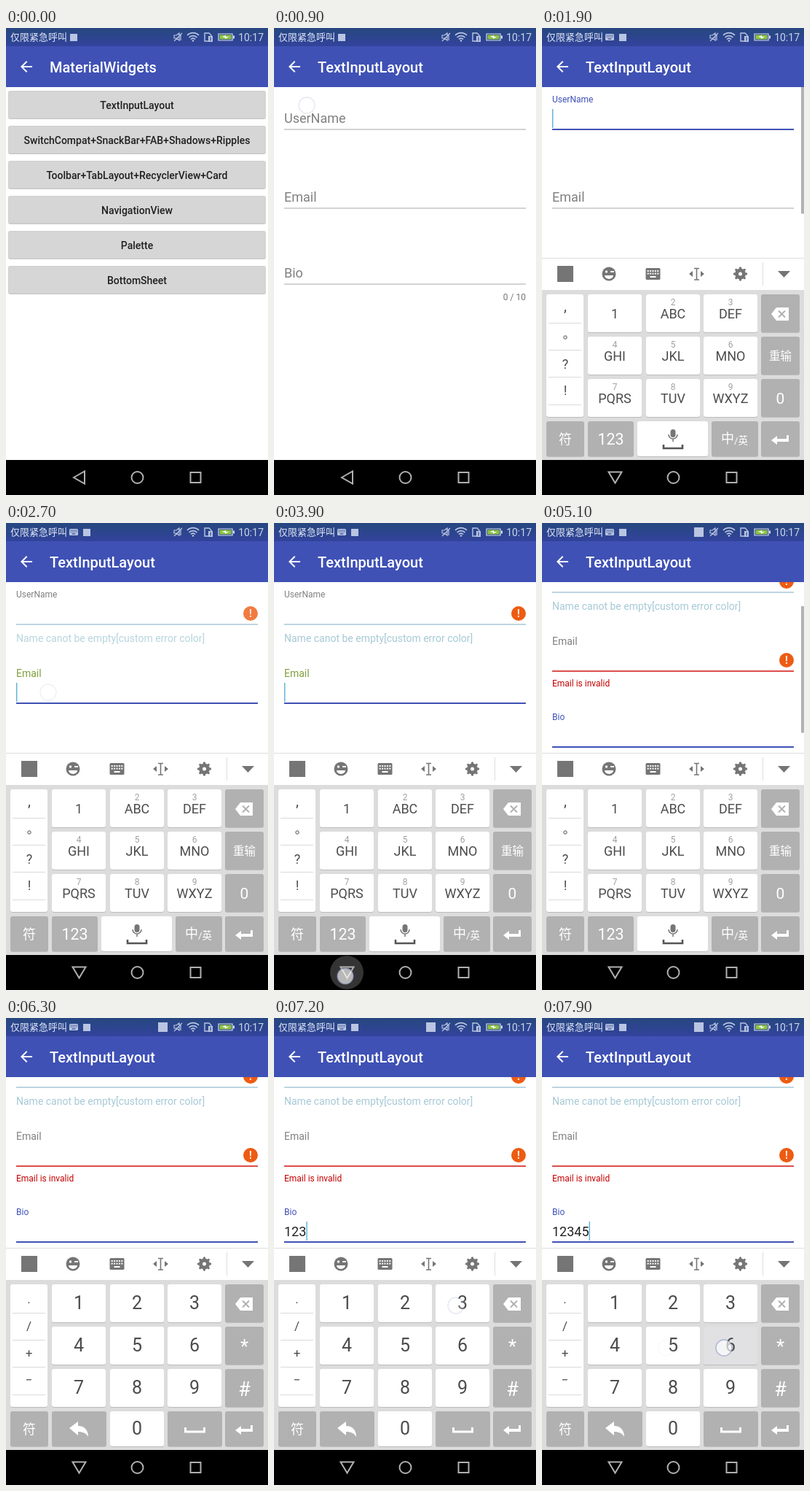
Animation of 360x640 px, one loop 8 s. Source, as an HTML page with a canvas:

```html
<!DOCTYPE html>
<html lang="en">
<head>
<meta charset="utf-8">
<title>Text input demo</title>
<style>
html, body { margin: 0; width: 100%; height: 100%; overflow: hidden; background: #fff }
canvas { display: block }
</style>
</head>
<body>
<canvas id="stage" width="360" height="640"></canvas>
<script>
const c = document.getElementById('stage').getContext('2d');
const LOOP = 8000, BLUE = '#3f51b5', STATUS = '#b9c5e2', ICON = '#757575', NAV = '#b0b0b0';
const FOCUS = { name: 1620, email: 2500, bio: 4600 };
const BACK = 3860, NUMERIC = 6080;

const MENU = ['TextInputLayout', 'SwitchCompat+SnackBar+FAB+Shadows+Ripples',
  'Toolbar+TabLayout+RecyclerView+Card', 'NavigationView', 'Palette', 'BottomSheet'];
const COLS = [63, 143, 222], ROWS = [365, 423, 481];
const LETTERS = ['', 'ABC', 'DEF', 'GHI', 'JKL', 'MNO', 'PQRS', 'TUV', 'WXYZ'];
const TYPED = [6600, 6810, 7000, 7450, 7640, 7870];  // press times of keys 1 to 6
const TOUCHES = [[700, 45, 106], [1590, 60, 124], [2470, 58, 232], [BACK, 98, 621], [4500, 48, 324],
  [5980, 95, 563], ...TYPED.map((at, i) => [at, COLS[i % 3] + 28, ROWS[i / 3 | 0] + 29])];

const clamp = v => Math.min(1, Math.max(0, v));
const ramp = (t, from, length) => clamp((t - from) / length);
const ease = p => p * p * (3 - 2 * p);
const mix = (a, b, p) => a + (b - a) * p;

function text(s, x, y, size, color, align = 'left', weight = 400) {
  c.font = `${weight} ${size}px Roboto, "Noto Sans CJK SC", "Noto Sans CJK", sans-serif`;
  c.fillStyle = color;
  c.textAlign = align;
  c.fillText(s, x, y);
}
function box(x, y, w, h, color, r = 0) {
  c.fillStyle = color;
  c.beginPath();
  c.roundRect(x, y, w, h, r);
  c.fill();
}
function shape(d, color, width = 0, x = 0, y = 0) {
  const p = new Path2D(d);
  c.save();
  c.translate(x, y);
  c.fillStyle = c.strokeStyle = color;
  c.lineWidth = width;
  width ? c.stroke(p) : c.fill(p);
  c.restore();
}
function disc(x, y, r, fill, stroke, width = 1) {
  c.beginPath();
  c.arc(x, y, r, 0, 7);
  if (fill) { c.fillStyle = fill; c.fill(); }
  if (stroke) { c.strokeStyle = stroke; c.lineWidth = width; c.stroke(); }
}
function faded(alpha, draw) {
  if (alpha <= 0) return;
  c.save();
  c.globalAlpha *= alpha;
  draw();
  c.restore();
}

function keyboardIcon(x, y, w, h, color, hole) {
  box(x - w / 2, y - h / 2, w, h, color, 1.5);
  const u = w / 20;
  for (let row = 0; row < 2; row++)
    for (let i = 0; i < 5; i++) box(x + (i * 3.4 - 7.8) * u, y + (row * 3.6 - 5) * u, 2 * u, 2 * u, hole);
  box(x - 4 * u, y + 3 * u, 8 * u, 2 * u, hole);
}

function statusBar(t, keyboard, imeReady) {
  const g = c.createLinearGradient(0, 0, 0, 25);
  g.addColorStop(0, '#26477f');
  g.addColorStop(1, '#32439c');
  box(0, 0, 360, 25, g);
  text('仅限紧急呼叫', 6, 17, 13, '#e3e9f6');
  if (keyboard) keyboardIcon(93, 12.5, 12, 9, STATUS, '#2c458c');
  box(keyboard ? 106 : 88, 8, 10, 10, STATUS);
  if (imeReady) box(209, 6, 13, 13, STATUS);
  shape('M231 10h3l4-3v10l-4-3h-3zM231 18L242 7M240 9v8', STATUS, 1.2);
  shape('M249 10a11 11 0 0 1 16 0M251.5 13a7.5 7.5 0 0 1 11 0M254 15.5a4 4 0 0 1 6 0', STATUS, 1.7);
  disc(257, 17.5, 1.3, STATUS);
  shape('M273 7h6l3 3v8h-9z', STATUS, 1.4);
  box(278, 11, 6, 8, STATUS);
  box(280.5, 12.5, 1.2, 5, '#2c458c');
  shape('M292 8h19v9h-19z', '#d5dcee', 1.2);
  box(312, 10.5, 2, 4, '#d5dcee');
  box(293.5, 9.5, 16, 6, '#8cc63f');
  shape('M297 12l5-2v2h4l-5 3v-2z', '#fff');
  text('10:17', 354, 17.5, 14, '#cbd4ea', 'right');
}

function toolbar(title) {
  box(0, 25, 360, 56, BLUE);
  shape('M20 11H7.83l5.59-5.59L12 4l-8 8 8 8 1.41-1.41L7.83 13H20z', '#fff', 0, 16, 41);
  text(title, 60, 61, 20, '#fff', 'left', 500);
}

function menuPage(t) {
  box(0, 81, 360, 511, '#fff');
  toolbar('MaterialWidgets');
  MENU.forEach((label, i) => {
    const y = 86 + i * 48;
    box(3, y, 354, 39, '#c9c9c9', 3);
    box(3.5, y + .5, 353, 37, !i && t >= 700 ? '#c6c6c6' : '#d7d6d7', 2);
    text(label, 180, y + 25, 14, '#202020', 'center', 500);
  });
}

// Hint shrinks into a label above the line; y values are baselines.
function field(label, p, hintY, labelY, labelSize, color) {
  text(label, 14, mix(hintY, labelY, p ** 2.3), mix(18, labelSize, p), color);
}
function underline(y, color, width) { box(14, y - width / 2, 332, width, color); }
function errorIcon(y) {
  disc(336, y, 10, '#ee5b12');
  text('!', 336, y + 5, 14, '#fff', 'center', 700);
}
function cursor(t, since, x, y) {
  if (t >= since && (t - since) % 1000 < 500) box(x, y, 1.4, 26, '#58b2d6');
}

function formPage(t, bottom) {
  const on = key => ease(ramp(t, FOCUS[key], 200));
  const onName = t >= FOCUS.name && t < FOCUS.email;
  const onEmail = t >= FOCUS.email && t < FOCUS.bio, onBio = t >= FOCUS.bio;
  const nameError = ramp(t, FOCUS.email, 250), emailError = ramp(t, FOCUS.bio, 160);
  const scroll = onBio ? 44 : 0;

  box(0, 81, 360, 511, '#ededed');
  c.save();
  c.beginPath();
  c.rect(0, 81, 360, bottom - 81);
  c.clip();
  box(0, 81, 360, 511, '#fff');
  c.translate(0, -scroll);

  field('UserName', on('name'), 130, 102, 12, onName ? BLUE : '#808080');
  underline(139, nameError ? '#a6c9d6' : onName ? BLUE : '#c4c4c4', onName ? 2 : 1.6);
  if (onName) cursor(t, FOCUS.name, 14, 111);
  faded(nameError, () => {
    text('Name canot be empty[custom error color]', 14, 162.5, 14, '#a6c9d6');
    errorIcon(124);
  });

  field('Email', on('email'), 238, 210.5, 14, onEmail ? '#7fa03c' : '#808080');
  underline(247, emailError ? '#d01010' : onEmail ? BLUE : '#c4c4c4', onEmail ? 2 : 1.6);
  if (onEmail) cursor(t, FOCUS.email, 14, 219);
  faded(emailError, () => {
    text('Email is invalid', 14, 268, 12, '#c40000');
    errorIcon(232);
  });

  field('Bio', on('bio'), 342, 313.5, 12, t > FOCUS.bio + 150 ? BLUE : '#808080');
  underline(351, onBio ? BLUE : '#c4c4c4', onBio ? 2 : 1.6);
  const count = TYPED.filter(at => t >= at + 60).length;
  const value = '123456'.slice(0, count);
  text(value, 14, 343, 18, '#222');
  if (onBio) cursor(t, count ? Math.max(6600, TYPED[count - 1]) : FOCUS.bio, 14 + c.measureText(value).width, 323);
  text(count + ' / 10', 346, 373, 12, '#777', 'right');
  c.restore();

  const bar = onBio ? 1 - ramp(t, 5350, 350) : t >= 1680 ? 1 - ramp(t, 2150, 250) : 0;
  if (bottom < 592) faded(bar, () => box(356, onBio ? 114 : 81, 4, 173.5, '#b2b2b2'));
  toolbar('TextInputLayout');
}

function key(x, y, w, h, color) {
  box(x, y + 1, w, h, '#bcbcbc', 3);
  box(x, y, w, h, color, 3);
}
function enterIcon(x, y) {
  shape('M-12 0l8-6v4h13v-5h3v9H-4v4z', '#fff', 0, x, y);
}

function keyboard(t) {
  const numeric = t >= NUMERIC, GREY = '#b1b1b1', INK = '#4c4c4c';
  box(0, 315, 360, 44, '#fff');
  box(0, 315, 360, 1, '#dedede');
  box(0, 359, 360, 233, '#dcdcdc');

  box(21, 326, 22, 22, ICON);
  disc(92, 337, 9.5, ICON);
  disc(88.5, 334, 1.7, '#fff');
  box(94, 333, 5, 1.8, '#fff');
  shape('M86 339h12a6 5 0 0 1-12 0z', '#fff');
  keyboardIcon(152.5, 337, 20, 16, ICON, '#fff');
  shape('M209 329.5h7M209 345h7M212.5 329.5v15.5', ICON, 1.6);
  shape('M207 333v8l-5-4zM218 333v8l5-4z', ICON);
  disc(272.5, 337, 5, null, ICON, 5);
  for (let i = 0; i < 8; i++) {
    const a = i * Math.PI / 4;
    disc(272.5 + 8 * Math.cos(a), 337 + 8 * Math.sin(a), 1.7, ICON);
  }
  box(303, 321, 1, 32, '#dedede');
  shape('M324 333h17l-8.5 9z', ICON);

  key(6, 365, 51, 168, '#fff');
  [404, 441, 478, 516].forEach(y => box(9, y, 45, 1, '#dadada'));
  if (numeric) [...'./+−'].forEach((s, i) => text(s, 31.5, [391, 428, 465, 502][i], 17, INK, 'center'));
  else {
    text(',', 32, 388, 20, INK, 'center');
    disc(32, 424, 2.2, null, INK);
    text('?', 32, 467, 18, INK, 'center');
    text('!', 32, 503, 18, INK, 'center');
  }

  for (let i = 0; i < 9; i++) {
    const x = COLS[i % 3], y = ROWS[i / 3 | 0], mid = x + 37;
    const pressed = t >= TYPED[i] && t < TYPED[i] + 110;
    key(x, y, 74, 52, pressed ? '#e1e1e3' : '#fff');
    if (numeric) text(i + 1, mid, y + 34, 25, INK, 'center');
    else {
      text(LETTERS[i] || 1, mid, y + 33, 18, INK, 'center');
      if (i) text(i + 1, mid, y + 14.5, 12, '#a0a0a0', 'center');
    }
  }

  ROWS.forEach(y => key(301, y, 53, 52, GREY));
  shape('M315 392l7-9h17v18h-17z', '#fff');
  shape('M325 387.5l9 9m0-9l-9 9', GREY, 2);
  if (numeric) {
    text('*', 327.5, 459, 26, '#fff', 'center');
    text('#', 327.5, 518, 27, '#fff', 'center');
  } else {
    text('重输', 327.5, 455, 15.5, '#fff', 'center', 500);
    text('0', 327.5, 515, 21, '#fff', 'center');
  }

  key(6, 539, 52, 48, GREY);
  text('符', 32, 570, 18, '#fff', 'center');
  key(301, 539, 53, 48, GREY);
  enterIcon(327, 565);
  if (numeric) {
    key(63, 539, 75, 48, GREY);
    shape('M87 562l12-9v6c9 0 14 6 14 15-3-5-7-7-14-7v5z', '#fff');
    key(143, 539, 74, 48, '#fff');
    text('0', 180, 571, 25, INK, 'center');
    key(222, 539, 75, 48, GREY);
    shape('M246.5 561v6h26v-6', '#fff', 3);
  } else {
    key(63, 539, 63, 48, t >= 5980 ? '#9c9c9c' : GREY);
    text('123', 94.5, 571, 21.5, '#fff', 'center');
    key(131, 539, 97, 48, '#fff');
    box(176.5, 550, 7, 11, ICON, 3.5);
    shape('M174 557a6 6 0 0 0 12 0M180 563v4', ICON, 1.5);
    shape('M167 571v5h26v-5', '#555', 2.6);
    key(233, 539, 64, 48, GREY);
    text('中', 246, 569, 18, '#fff');
    text('/英', 264, 570, 13.5, '#fff');
  }
}

function navBar(t, keyboardOpen) {
  box(0, 592, 360, 48, '#000');
  if (t >= BACK) faded(1 - ramp(t, 3950, 250), () => disc(100, 616, 23, '#343434'));
  shape(keyboardOpen ? 'M91.5 608.5h18l-9 15z' : 'M93 616l15-8.5v17z', NAV, 2);
  disc(180.5, 616, 8, null, NAV, 2);
  shape('M253.5 609h14v14h-14z', NAV, 2);
}

function touch(t, [at, x, y]) {
  if (t < at) return;
  faded(1 - ramp(t, at + 60, 220), () => disc(x, y, 11, 'rgba(255,255,255,.65)', 'rgba(125,140,190,.55)', 1.4));
}

function draw(t) {
  const opened = t < 4050 ? FOCUS.name : FOCUS.bio;
  const resized = t >= FOCUS.name + 50 && t < 3960 || t >= FOCUS.bio + 50;
  const iconOn = t >= FOCUS.name + 50 && t < 4050 || t >= FOCUS.bio + 50;
  const shown = ease(ramp(t, opened + 110, 160)) * (t < FOCUS.bio ? 1 - ramp(t, 3930, 170) : 1);
  const imeReady = t >= 2120 && t < FOCUS.email || t >= 3000 && t < BACK || t >= 5100;

  if (t < 880) menuPage(t);
  faded(ease(ramp(t, 750, 110)), () => formPage(t, resized ? 315 : 592));
  if (shown > 0) {
    c.save();
    c.beginPath();
    c.rect(0, 315, 360, 277);
    c.clip();
    c.translate(0, 277 * (1 - shown));
    keyboard(t);
    c.restore();
  }
  statusBar(t, iconOn, imeReady);
  navBar(t, iconOn);
  TOUCHES.forEach(item => touch(t, item));
}

const start = performance.now();
function tick() {
  draw((performance.now() - start) % LOOP);
  requestAnimationFrame(tick);
}
tick();
</script>
</body>
</html>
```
